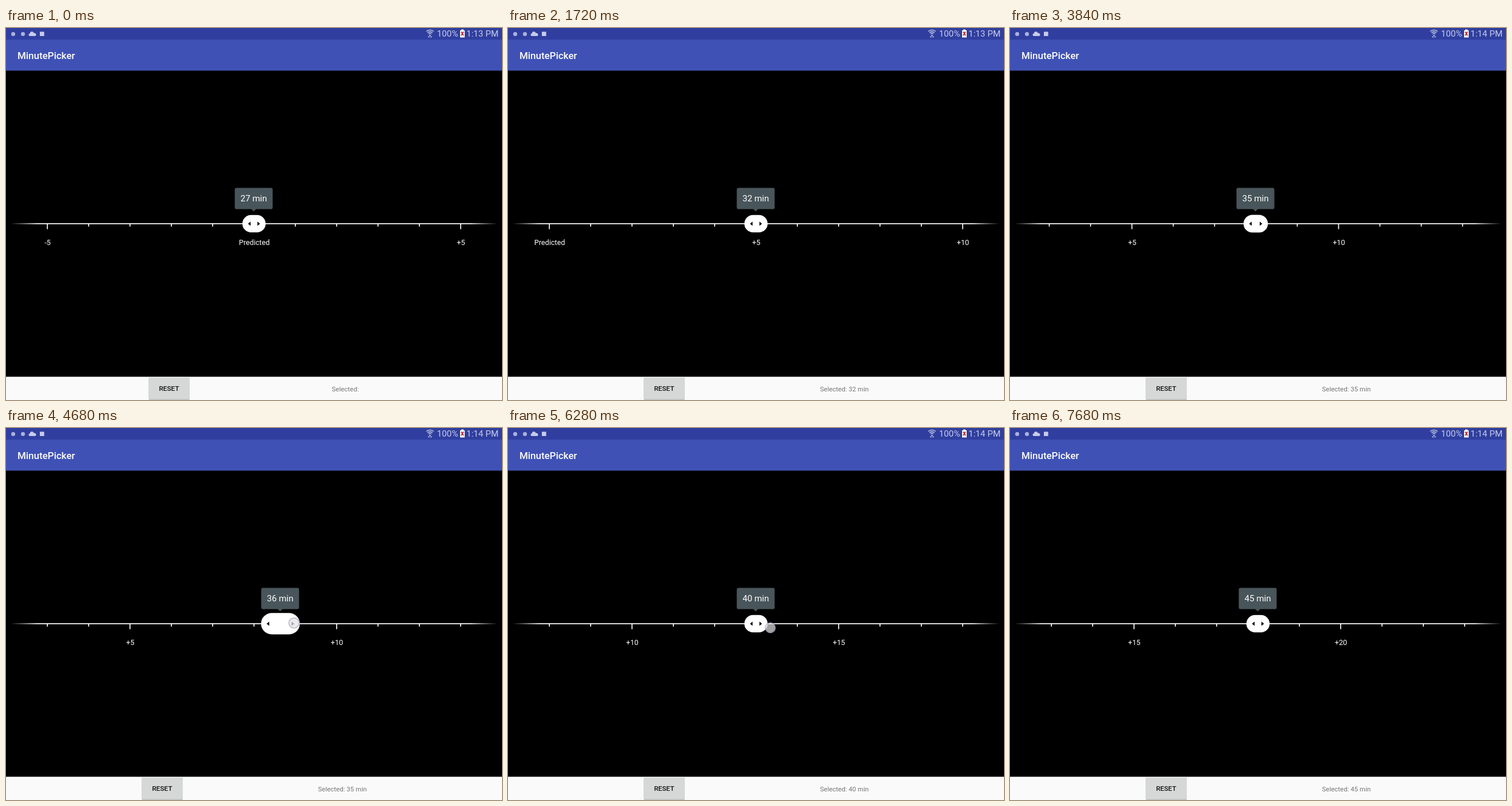
These frames come from a looping animation (864x648 px, 8 s). An HTML page with a canvas:

```html
<!DOCTYPE html>
<html lang="en">
<head>
<meta charset="utf-8">
<title>Minute slider</title>
<style>
html, body { margin: 0; width: 100%; height: 100%; overflow: hidden; background: #000; }
canvas { display: block; width: 864px; height: 648px; }
</style>
</head>
<body>
<canvas id="stage" width="864" height="648"></canvas>
<script>
const ctx = document.getElementById('stage').getContext('2d');
const W = 864, H = 648, LOOP = 8000, STEP = 40;
const DP = 0.84375;
const STATUS = 24 * DP, TOOLBAR = 64 * DP, FOOTER = H - 48 * DP;
const AXIS = (STATUS + TOOLBAR + FOOTER) / 2;
const MID = 432, GAP = 72, BASE = 27;
const SCROLL = 440, GROW = 200;

// Each drag: touch path as [time, x, y], lift time, value at the centre before and after.
const drags = [
  { from: 0, to: 5, lift: 1280, path: [[600, 455, 345], [720, 460, 344], [1180, 818, 334], [1280, 820, 333]] },
  { from: 5, to: 8, lift: 3560, path: [[2280, 453, 340], [2400, 457, 339], [2840, 726, 329], [3040, 693, 327], [3560, 692, 327]] },
  { from: 8, to: 13, lift: 5240, path: [[4440, 456, 342], [4560, 461, 341], [5160, 852, 328], [5240, 854, 328]] },
  { from: 13, to: 18, lift: 7240, path: [[6280, 457, 348], [6420, 462, 347], [7040, 789, 338], [7240, 791, 338]] }
];

const clamp = (v, lo, hi) => Math.min(hi, Math.max(lo, v));
const mix = (a, b, k) => a + (b - a) * k;
const smooth = k => k * k * (3 - 2 * k);
const overshoot = k => {
  const u = k - 1, tension = 0.77;
  return u * u * ((tension + 1) * u + tension) + 1;
};

function touchAt(path, t) {
  let i = 0;
  while (i < path.length - 2 && t > path[i + 1][0]) i++;
  const [a, b] = [path[i], path[i + 1]];
  const k = smooth(clamp((t - a[0]) / (b[0] - a[0]), 0, 1));
  return { x: mix(a[1], b[1], k), y: mix(a[2], b[2], k) };
}

function stateAt(t) {
  const s = { center: 0, x: MID, open: 0, value: 0, picked: null, touch: null };
  for (const d of drags) {
    const start = d.path[0][0];
    if (t < start) break;
    const touch = touchAt(d.path, Math.min(t, d.lift));
    const dragX = clamp(MID + touch.x - d.path[0][1], 72, 792);
    if (t <= d.lift) {
      s.center = d.from;
      s.x = dragX;
      s.value = d.from + Math.round((dragX - MID) / GAP);
      s.open = smooth(clamp((t - start) / GROW, 0, 1));
      s.touch = touch;
    } else {
      const k = clamp((t - d.lift) / SCROLL, 0, 1);
      s.center = mix(d.from, d.to, overshoot(k));
      s.x = mix(dragX, MID, overshoot(k));
      s.open = Math.pow(1 - k, 2.6);
      s.value = s.picked = d.to;
      s.touch = null;
    }
  }
  s.x = Math.round(s.x);
  return s;
}

function rect(x, y, w, h, color) {
  ctx.fillStyle = color;
  ctx.fillRect(x, y, w, h);
}

function round(x, y, w, h, r, color) {
  ctx.fillStyle = color;
  ctx.beginPath();
  ctx.roundRect(x, y, w, h, r);
  ctx.fill();
}

function poly(points, color) {
  ctx.fillStyle = color;
  ctx.beginPath();
  points.forEach(([x, y]) => ctx.lineTo(x, y));
  ctx.closePath();
  ctx.fill();
}

function disc(x, y, r, color) {
  ctx.fillStyle = color;
  ctx.beginPath();
  ctx.arc(x, y, r, 0, Math.PI * 2);
  ctx.fill();
}

function text(str, x, y, size, color, align = 'center', weight = 400) {
  ctx.font = `${weight} ${size}px Roboto, sans-serif`;
  ctx.textAlign = align;
  ctx.fillStyle = color;
  ctx.fillText(str, x, y);
}

function drawBars(t) {
  const ink = '#c5cbea';
  rect(0, 0, W, STATUS + TOOLBAR, '#3f51b5');
  rect(0, 0, W, STATUS, '#303f9f');
  text('MinutePicker', 20, 54, 16.9, '#fff', 'left', 500);

  disc(12.5, 10.5, 3.5, '#aab2dd');
  disc(29.5, 10.5, 3.5, '#aab2dd');
  disc(45, 9.5, 3.2, ink);
  disc(49, 11, 2.5, ink);
  round(39.5, 9.5, 13, 4.5, 2.2, ink);
  rect(59, 6.5, 7.5, 7.5, ink);

  ctx.strokeStyle = ink;
  ctx.lineWidth = 1.4;
  for (const r of [3.5, 6.5, 9.5]) {
    ctx.beginPath();
    ctx.arc(738.5, 13, r, -Math.PI * 0.74, -Math.PI * 0.26);
    ctx.stroke();
  }
  disc(738.5, 13, 1.3, ink);
  rect(735.5, 14.5, 2, 2, ink);
  rect(739.5, 14.5, 2, 2, ink);

  text('100%', 750.8, 15, 15.2, ink, 'left');
  rect(793, 2.5, 4, 2, '#fff');
  rect(791, 4, 8, 12.5, '#fff');
  ctx.strokeStyle = '#c62a2a';
  ctx.lineWidth = 2;
  ctx.beginPath();
  ctx.moveTo(793, 6.5);
  ctx.lineTo(797, 13);
  ctx.moveTo(797, 6.5);
  ctx.lineTo(793, 13);
  ctx.stroke();
  text(t < 3400 ? '1:13 PM' : '1:14 PM', 858, 15, 15.2, ink, 'right');
}

function drawScale(center) {
  const fade = ctx.createLinearGradient(8, 0, 856, 0);
  fade.addColorStop(0, 'rgba(255,255,255,0)');
  fade.addColorStop(0.055, '#fff');
  fade.addColorStop(0.945, '#fff');
  fade.addColorStop(1, 'rgba(255,255,255,0)');
  rect(8, AXIS - DP, 848, 2 * DP, fade);
  for (let n = Math.floor(center) - 7; n <= center + 7; n++) {
    const x = MID + (n - center) * GAP;
    const major = n % 5 === 0;
    rect(x - DP, AXIS, 2 * DP, major ? 9.5 : 5, fade);
    if (major) text(n === 0 ? 'Predicted' : (n > 0 ? '+' : '') + n, x + 0.5, 378, 12.66, '#fff');
  }
}

function drawHandle({ x, open, value }) {
  const w = mix(48, 80, open) * DP, h = mix(36, 44, open) * DP;
  round(x - w / 2, AXIS - h / 2, w, h, h / 2, '#fff');
  const near = mix(6, 19.5, open);
  for (const side of [-1, 1]) {
    const inner = x + side * near, outer = inner + side * 4.5;
    poly([[inner, AXIS - 3.7], [outer, AXIS], [inner, AXIS + 3.7]], '#000');
  }
  const slate = '#48555a', tip = x - 0.5;
  round(tip - 33, 278.5, 66, 37, 3, slate);
  poly([[tip - 4.5, 315], [tip + 4.5, 315], [tip, 319.5]], slate);
  text(`${BASE + value} min`, tip, 302, 15.2, '#fff');
}

function drawTouch({ x, y }) {
  disc(x, y, 10, 'rgba(110,110,140,0.25)');
  disc(x, y, 8.5, 'rgba(245,245,245,0.62)');
  ctx.strokeStyle = 'rgba(165,168,190,0.75)';
  ctx.lineWidth = 1.2;
  ctx.beginPath();
  ctx.arc(x, y, 8.6, 0, Math.PI * 2);
  ctx.stroke();
}

function drawFooter(picked) {
  const empty = picked === null;
  const left = empty ? 248.5 : 236.5;
  rect(0, FOOTER, W, H - FOOTER, '#fafafa');
  round(left, 609, 71.5, 39, 2, '#bfc0c0');
  round(left, 609, 71.5, 37.5, 2, '#d6d7d7');
  text('RESET', left + 35.5, 632, 11.8, '#111', 'center', 500);
  const label = empty ? 'Selected:' : `Selected: ${BASE + picked} min`;
  text(label, empty ? 567.5 : 543.5, 633, 11.5, '#757575', 'left');
}

function draw(t) {
  const s = stateAt(t);
  rect(0, 0, W, H, '#000');
  drawScale(s.center);
  drawHandle(s);
  if (s.touch) drawTouch(s.touch);
  drawBars(t);
  drawFooter(s.picked);
}

const began = performance.now();
function tick() {
  const t = (performance.now() - began) % LOOP;
  draw(Math.floor(t / STEP) * STEP);
  requestAnimationFrame(tick);
}
draw(0);
requestAnimationFrame(tick);
</script>
</body>
</html>
```
